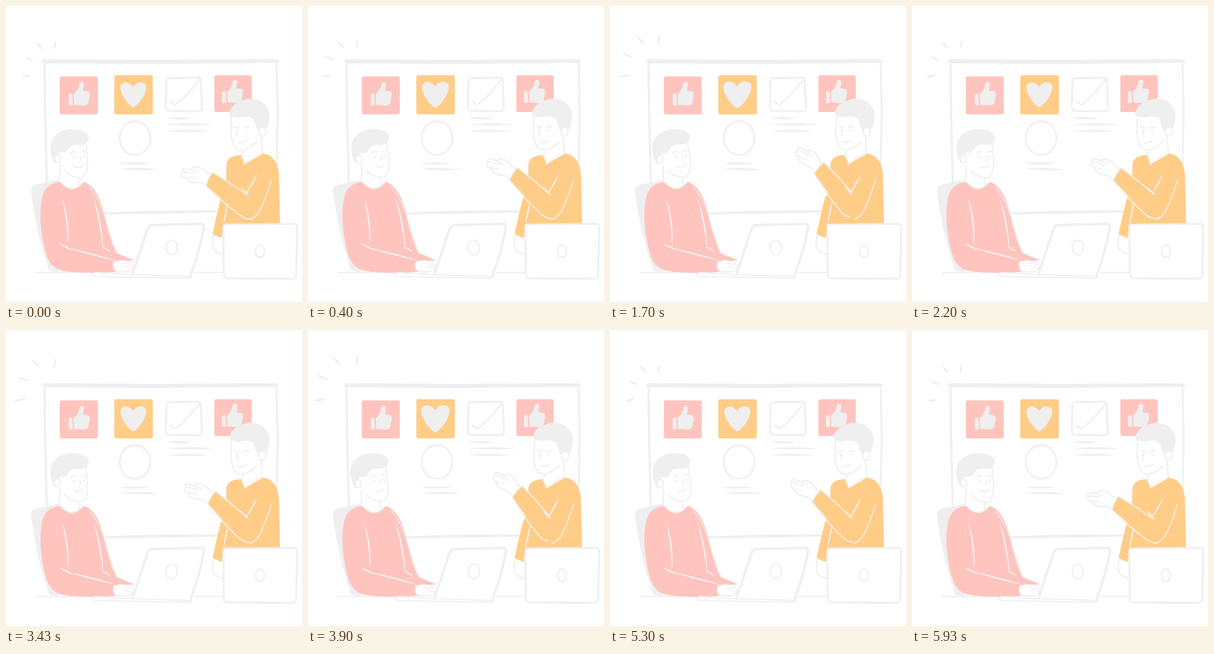
Recreate the animation shown at these times as an HTML page with a canvas. Size 500 by 500 pixels, loop 6630 ms.

```html
<!DOCTYPE html>
<html lang="en">
<head>
<meta charset="utf-8">
<title>Team feedback</title>
<style>
html, body { margin: 0; width: 100%; height: 100%; overflow: hidden; background: #fff; }
canvas { display: block; width: 500px; height: 500px; }
</style>
</head>
<body>
<canvas id="stage" width="500" height="500"></canvas>
<script>
const ctx = document.getElementById('stage').getContext('2d');
const LOOP = 6630;
const GREY = '#efefef', PINK = '#ffc4be', ORANGE = '#ffcd87', WHITE = '#fff';
ctx.lineCap = ctx.lineJoin = 'round';

function fill(d, color) {
  ctx.fillStyle = color;
  ctx.fill(new Path2D(d));
}

function line(d, width = 2.5, color = GREY) {
  ctx.strokeStyle = color;
  ctx.lineWidth = width;
  ctx.stroke(new Path2D(d));
}

function shape(d, color, width = 2.5) {
  fill(d, color);
  line(d, width);
}

// Brush stroke with pointed ends; bend pushes the middle sideways.
function brush(x1, y1, x2, y2, width = 4, bend = 0) {
  const dx = x2 - x1, dy = y2 - y1, len = Math.hypot(dx, dy);
  const nx = -dy / len, ny = dx / len;
  const side = k => {
    const off = bend * 1.33 + k * width * 0.67;
    return [0.25, 0.75].map(p => [x1 + dx * p + nx * off, y1 + dy * p + ny * off]);
  };
  const [a, b] = side(1), [c, d] = side(-1);
  ctx.fillStyle = GREY;
  ctx.beginPath();
  ctx.moveTo(x1, y1);
  ctx.bezierCurveTo(...a, ...b, x2, y2);
  ctx.bezierCurveTo(...d, ...c, x1, y1);
  ctx.fill();
}

function oval(x, y, rx, ry, width, color) {
  ctx.beginPath();
  ctx.ellipse(x, y, rx, ry, 0, 0, Math.PI * 2);
  if (color) { ctx.fillStyle = color; ctx.fill(); }
  ctx.strokeStyle = GREY;
  ctx.lineWidth = width;
  ctx.stroke();
}

function tile(x, y, w, h, color) {
  ctx.fillStyle = color;
  ctx.beginPath();
  ctx.roundRect(x, y, w, h, 3);
  ctx.fill();
}

function turned(x, y, degrees, scale, draw) {
  ctx.save();
  ctx.translate(x, y);
  ctx.rotate(degrees * Math.PI / 180);
  ctx.scale(scale, scale);
  ctx.translate(-x, -y);
  draw();
  ctx.restore();
}

// Eased value along [time, value] keys.
function track(t, keys) {
  const i = keys.findIndex(k => k[0] > t);
  if (i === 0) return keys[0][1];
  if (i < 0) return keys[keys.length - 1][1];
  const [t0, v0] = keys[i - 1], [t1, v1] = keys[i];
  return v0 + (v1 - v0) * (1 - Math.cos(Math.PI * (t - t0) / (t1 - t0))) / 2;
}

const RAYS = [[150, 0], [1100, 1], [1200, 1], [2500, 0], [3950, 1], [4100, 1], [5500, 0]];
const ARM = [[0, 0], [950, 1], [1300, 1], [2800, 0], [4250, 1], [4700, 1], [5930, 0]];
const HAND = [[0, 0], [950, 1], [1750, 1], [2800, 0], [3300, 0], [4300, 1], [4700, 1], [5930, 0]];
const NOD = [[150, 0], [850, 1], [1250, 1], [2200, 0], [3450, 0], [4250, 1], [4650, 1], [5400, 0]];
const TILT = [[150, 0], [850, 1], [1300, 1], [2200, 0], [3450, 0], [4300, 1], [4700, 1], [5850, 0]];

function thumb() {
  fill('M106 149Q109 146 112 149L113 167Q109 169 106 167Z', GREY);
  fill('M114 149Q123 142 124 131Q129 125 132 132L130 143L139 144Q143 147 141 153L139 164Q137 168 131 168L115 167Z', GREY);
}

function drawRays(s) {
  brush(51 - 11 * s, 61 - 17 * s, 63 - 7 * s, 74 - 13 * s, 3.5);
  brush(85, 59 - 17 * s, 82, 74 - 13 * s, 3.5, 1);
  brush(32 - 17 * s, 86 - 10 * s, 47 - 12 * s, 93 - 8 * s, 3.5);
  brush(26 - 18 * s, 120, 42 - 11 * s, 117 - s, 3.5);
}

function drawBoard(beat) {
  line('M65 97L66 180L69 300', 3.5);
  line('M457 97L459 180L457 270', 3);
  fill('M60 94Q62 88 70 90L250 91L456 90L463 93L456 96L245 98L66 97Z', GREY);
  fill('M158 349L240 346L358 345V349L240 351L168 352Z', GREY);

  tile(91, 119, 64, 64, PINK);
  thumb();
  tile(183, 117, 65, 66, ORANGE);
  turned(215, 149, 0, 1 + 0.16 * beat, () =>
    fill('M215 171C207 168 190 146 194 134C198 127 209 128 215 137C220 127 231 127 236 133C241 144 224 168 215 171Z', GREY));
  tile(352, 117, 63, 62, PINK);
  ctx.save();
  ctx.translate(259, -4);
  thumb();
  ctx.restore();

  line('M273 122L326 121Q329 122 329 128L331 173Q330 178 324 178L274 177Q270 176 270 170L271 124', 3);
  line('M277 161L286 167Q303 155 328 123', 2.5);
  brush(272, 189, 313, 190, 4);
  brush(272, 200, 350, 200, 3.5);
  brush(272, 211, 342, 211, 3.5);
  oval(218, 223, 26, 28.5, 2.8);
  brush(191, 266, 243, 266, 3.5);
  brush(191, 275, 259, 276, 3.5);
}

function drawListenerHead() {
  fill('M88 240L90 268L91 295Q110 310 124 300L123 291Q136 291 138 268L135 228L104 232Z', WHITE);
  line('M92 268L90 294', 2.2);
  line('M122 291L123 302', 2.2);
  line('M135 231L138 262Q138 287 127 290Q108 290 99 277', 2);
  fill('M82 266Q72 248 76 231Q82 211 108 208Q136 208 140 221Q140 232 128 235Q111 232 106 240Q101 250 93 247Q86 248 87 259Z', GREY);
  oval(87, 258, 5, 7, 2, WHITE);
  line('M109 249Q113 244 118 247', 2);
  line('M127 247Q131 244 134 246', 2);
  line('M114 254L115 257M131 253L132 256', 2.5);
  line('M125 254Q128 260 124 262', 1.8);
  line('M115 271Q125 276 130 269', 2);
}

function drawListener(tilt) {
  fill('M42 311Q42 305 50 302L90 293L75 375L90 450L73 447Q50 380 42 311Z', GREY);
  fill('M92 297C76 299 66 306 62 320C55 346 58 382 67 416Q74 442 94 447C124 452 156 451 186 449Q178 440 182 431L216 430L188 417Q178 397 167 354C159 322 149 303 131 297Q112 318 92 297Z', PINK);
  turned(112, 294, -7 * tilt, 1, drawListenerHead);
  line('M92 297Q111 319 130 298', 2.5);
  line('M141 306Q159 327 167 356Q178 402 187 417L216 429', 1.4);
  brush(94, 324, 104, 406, 2.8, -4);
  brush(89, 401, 113, 413, 2.8);
  brush(105, 409, 186, 430, 2.8);
  brush(147, 322, 164, 412, 2.8, -3);
  brush(162, 406, 178, 416, 2.2);
  shape('M183 434Q190 428 202 431Q213 431 215 440Q214 449 204 449L187 449Q178 443 183 434Z', WHITE, 1.8);
  line('M195 434L211 437M199 439L214 443', 1.6);
}

function drawLeftLaptop() {
  fill('M243 370L335 368L311 458L214 458Z', WHITE);
  line('M214 452L239 377Q241 370 248 370L329 368Q336 368 334 376Q327 415 312 454', 4);
  shape('M146 453Q147 450 154 450L215 454L314 457Q313 459 308 460L154 457Q147 456 146 453Z', WHITE, 2);
  oval(280, 408, 9.5, 12.5, 2.2);
}

function drawSpeakerHead() {
  fill('M400 238L398 254L403 267L433 250L434 212L443 205L442 185L400 170L381 184L380 215Q382 244 400 244Z', WHITE);
  line('M400 244L398 256', 2.2);
  line('M431 221L433 248', 2.2);
  line('M381 186L380 215Q382 243 398 244Q412 242 424 229', 2.2);
  fill('M377 183Q380 167 393 163Q410 151 431 161Q446 171 445 190Q443 201 441 208Q434 200 430 207L427 212Q421 205 419 193Q413 184 396 188Q384 190 377 183Z', GREY);
  oval(433, 212, 6, 7.5, 2, WHITE);
  line('M385 204L394 206M401 206Q406 203 411 205', 2);
  line('M389 209L390 211M405 210L407 211', 2.5);
  line('M392 211Q387 219 392 220', 1.8);
  line('M392 231Q400 232 407 227', 2);
}

function drawSpeakerHand() {
  shape('M348 284L340 282Q331 272 322 272Q315 271 311 276L299 275Q294 277 298 280L297 286Q298 289 303 290L308 295Q316 300 328 298L340 303Z', WHITE, 2.2);
  line('M299 280L318 282M302 289L318 290M311 276L324 280', 1.8);
}

function drawForearm(hand) {
  turned(345, 291, 11 * hand, 1, drawSpeakerHand);
  fill('M349 281Q342 290 338 303L392 350Q410 367 426 350L436 310L407 317Z', ORANGE);
  line('M349 281Q341 291 338 303', 2);
  line('M349 281L384 303L407 319', 2);
  line('M338 304Q365 331 391 350Q404 361 414 360', 2);
}

function drawSpeaker(arm, hand, nod) {
  shape('M350 387Q346 406 352 413Q358 417 368 421L369 390Z', WHITE, 2.2);
  fill('M398 252C383 252 374 256 372 268Q370 288 371 308L363 325Q354 360 349 385L364 392L369 369L463 369L461 285C459 259 447 250 431 249L403 268Z', ORANGE);
  turned(415, 238, 4.5 * nod, 1, drawSpeakerHead);
  line('M398 251L403 267Q414 256 431 249', 1.8);
  line('M372 266Q371 286 372 308', 1.6);
  brush(376, 326, 367, 370, 2.5);
  turned(424, 322, 17 * arm, 1, () => drawForearm(hand));
  line('M449 293Q439 325 429 345Q422 358 412 360', 1.8);
  brush(424, 283, 404, 319, 2.6, -1);
  brush(396, 305, 411, 320, 2.4);
}

function drawRightLaptop() {
  shape('M370 369L488 368Q492 368 492 375L490 455Q490 460 484 461L373 460Q368 460 368 454L367 374Q367 369 370 369Z', WHITE, 3);
  oval(429, 414, 7.5, 10.5, 2.2);
  line('M422 419Q426 428 435 422', 2.5);
}

function render(t) {
  const nod = track(t, NOD);
  ctx.fillStyle = WHITE;
  ctx.fillRect(0, 0, 500, 500);
  drawRays(track(t, RAYS));
  drawBoard(nod);
  line('M51 450L150 450M318 450L368 450', 1.8);
  drawListener(track(t, TILT));
  drawLeftLaptop();
  drawSpeaker(track(t, ARM), track(t, HAND), nod);
  drawRightLaptop();
}

const start = performance.now();
function tick() {
  render((performance.now() - start) % LOOP);
  requestAnimationFrame(tick);
}
tick();
</script>
</body>
</html>
```
